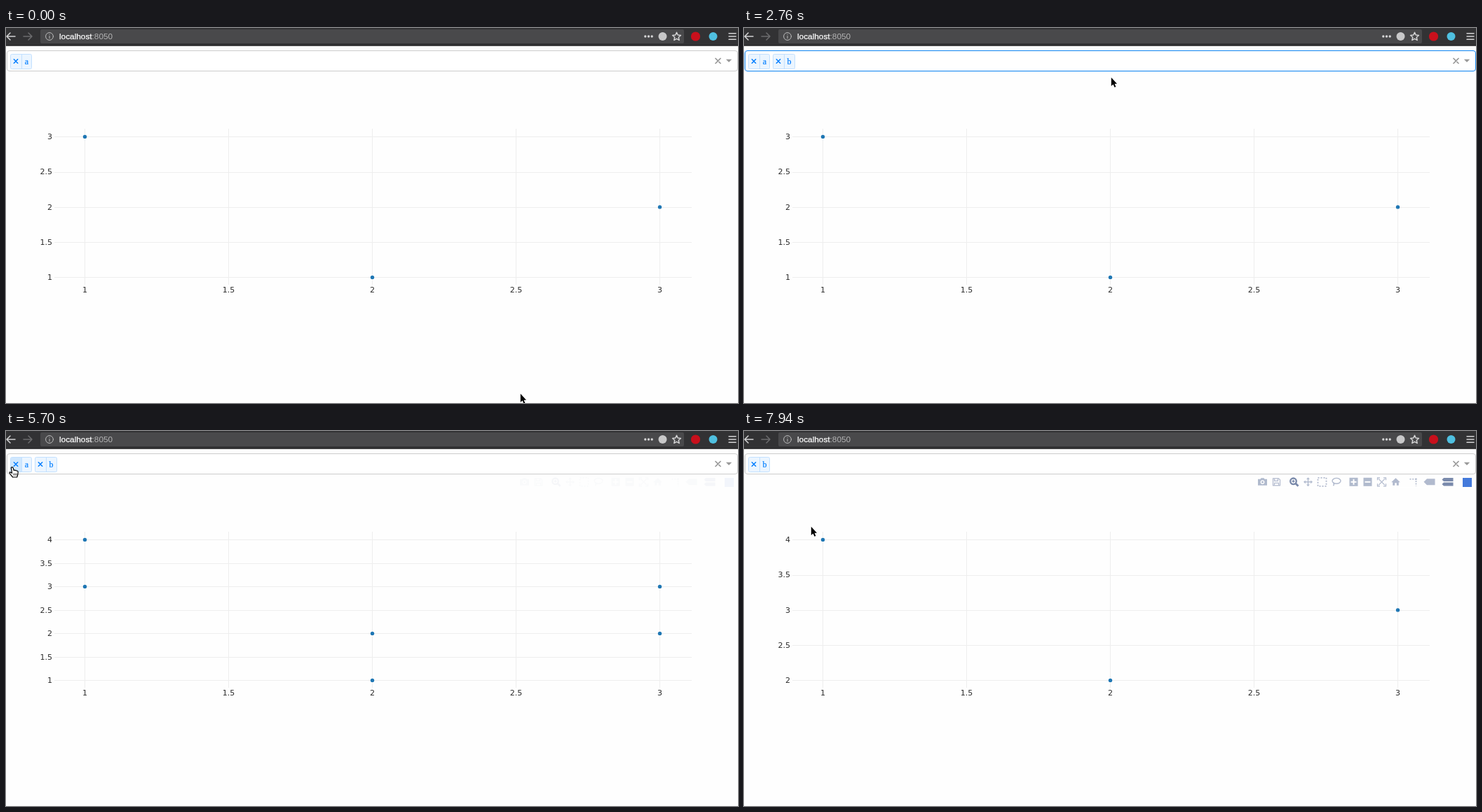
An HTML page for the animation above (8 s loop, 1044x536 px).

```html
<!DOCTYPE html>
<html lang="en">
<head>
<meta charset="utf-8">
<title>Dropdown and scatter plot</title>
<style>
  html, body { margin: 0; height: 100%; overflow: hidden; background: #fefefe; }
  svg { display: block; width: 100vw; height: 100vh; }
  .url { font: 11.8px "Liberation Sans", Arial, sans-serif; fill: #b4b4b5; }
  .tick { font: 11px "DejaVu Sans", Verdana, sans-serif; fill: #2c2c2c; }
  .serif { font: 12px "Liberation Serif", Times, serif; }
  .line { fill: none; stroke-linecap: round; stroke-linejoin: round; }
</style>
</head>
<body>
<svg viewBox="0 0 1044 536">
  <defs>
    <path id="arrow" d="M.8 .8V13L3.5 10.6 5.5 14.8 7.4 14 5.5 9.8H9Z" stroke="#fff" stroke-width="1.5" paint-order="stroke"/>
    <g id="hand" stroke="#000" stroke-width="1.2" stroke-linejoin="round">
      <path fill="#fff" d="M3.3 2.6Q4.6 .6 6 2.4L7.2 6.3Q8.7 5.2 9.3 6.6 10.8 5.7 11.3 7.1 13 6.6 13.2 8.4L12.9 12 11.7 16H5.6L2 11.6Q.2 9.2 1.9 8.7L4.6 10.3Z"/>
      <path fill="none" stroke-width=".8" d="M7 10.5V13.5M9 10.5V13.5M11 10.5V13.5"/>
    </g>
  </defs>
  <rect width="1044" height="536" fill="#fefefe"/>

  <g id="browser">
    <rect width="1044" height="25.5" fill="#323234"/>
    <rect y="24.5" width="1044" height="1" fill="#1d1d1e"/>
    <rect x="49" y="2" width="918" height="20" rx="2" fill="#49494b"/>
    <g class="line" stroke="#d4d4d5" stroke-width="1.5">
      <path d="M13 12H1M6 7L1 12L6 17"/>
      <path stroke="#6c6c6e" d="M25 12H37M32 7L37 12L32 17"/>
      <g stroke="#bbb" stroke-width="1">
        <circle cx="62" cy="12" r="5.4"/>
        <path d="M62 11.5V14.8M62 9.1V9.3"/>
      </g>
      <path id="star"/>
      <path d="M1031 7.7H1041M1031 12H1041M1031 16.3H1041"/>
      <path id="chevron" stroke="#bbb" d="M892.5 10.5L896.5 14.5L900.5 10.5"/>
      <path stroke-width="3.4" d="M911.8 12h0M916.5 12h0M921.2 12h0"/>
    </g>
    <circle cx="936.5" cy="12" r="6" fill="#c8c8c9"/>
    <circle cx="983.5" cy="12" r="6.6" fill="#c8101c"/>
    <circle cx="1008.5" cy="12" r="6" fill="#4fc0e0"/>
    <text class="url" x="76" y="16.3"><tspan fill="#fff" stroke="#fff" stroke-width=".25">localhost</tspan>:8050</text>
  </g>

  <g id="charts"></g>

  <g id="select">
    <rect id="glow" x="0" y="30.5" width="1044" height="33" rx="5" fill="#e6f2ff"/>
    <rect id="control" x="1.5" y="32.5" width="1042" height="29" rx="3.5" fill="#fff"/>
    <g id="menu">
      <path d="M1.5 61.5H1043.5V88Q1043.5 91.5 1040 91.5H5Q1.5 91.5 1.5 88Z" fill="#e5f2fe" stroke="#ccc"/>
      <text id="option" class="serif" x="8.5" y="80"></text>
    </g>
    <g id="tags"></g>
    <path class="line" d="M1012 43.5L1019 50.5M1019 43.5L1012 50.5" stroke="#999" stroke-width="1.7"/>
    <path id="toggle" fill="#999"/>
    <path id="caret" stroke="#000" stroke-width="1.2"/>
  </g>

  <g id="modebar"></g>
  <use id="echo" href="#arrow" x="242" y="66"/>
  <use id="pointer"/>
</svg>

<script>
const LOOP = 8000;
const $ = id => document.getElementById(id);
const show = (id, on) => $(id).setAttribute('visibility', on ? 'visible' : 'hidden');
const within = (v, from, to) => v >= from && v < to;
const clamp = v => Math.min(1, Math.max(0, v));

// Bookmark star
const starPoint = i => {
  const r = i % 2 ? 2.9 : 6.2, a = (i / 5 - .5) * Math.PI;
  return `${956.5 + r * Math.cos(a)} ${12.4 + r * Math.sin(a)}`;
};
$('star').setAttribute('d', 'M' + Array.from({ length: 10 }, (_, i) => starPoint(i)).join('L') + 'Z');

// Charts
const SERIES = { a: [3, 1, 2], b: [4, 2, 3] };
const gridX = x => 112.5 + (x - 1) * 410;

function chart(id, names) {
  const values = names.flatMap(n => SERIES[n]);
  const lo = Math.min(...values), hi = Math.max(...values);
  const py = v => 356.4 - (v - lo) / (hi - lo) * 201;
  let grid = '', labels = '', dots = '';
  for (let x = 1; x <= 3; x += .5) {
    grid += `M${gridX(x)} 144V367`;
    labels += `<text class="tick" text-anchor="middle" x="${gridX(x)}" y="378.3">${x}</text>`;
  }
  for (let v = lo; v <= hi; v += .5) {
    grid += `M69 ${Math.round(py(v)) + .5}H978`;
    labels += `<text class="tick" text-anchor="end" x="66" y="${py(v) + 3.6}">${v}</text>`;
  }
  for (const n of names)
    SERIES[n].forEach((v, i) => dots += `<circle cx="${gridX(i + 1)}" cy="${py(v)}" r="2.7"/>`);
  return `<g id="${id}"><path d="${grid}" stroke="#eee"/>${labels}<g fill="#1f77b4">${dots}</g></g>`;
}
$('charts').innerHTML = chart('plotA', ['a']) + chart('plotAB', ['a', 'b']) + chart('plotB', ['b']);

// Dropdown tags
const tag = (name, x, hot) => `<g transform="translate(${x} 37)">
  <rect x=".5" y=".5" width="${x > 6 ? 31 : 30}" height="21" rx="2" fill="#ebf5ff" stroke="#c2e0ff"/>
  ${hot ? '<rect x="1" y="1" width="15" height="20" fill="#d0e7fd"/>' : ''}
  <path d="M16.5 1V21" stroke="#c2e0ff"/>
  <path class="line" d="M5.3 7.8L10.7 13.2M10.7 7.8L5.3 13.2" stroke="#007eff" stroke-width="1.5"/>
  <text class="serif" x="23.5" y="14.5" text-anchor="middle" fill="#007eff" stroke="#007eff" stroke-width=".2">${name}</text></g>`;

// Plot toolbar: each icon is drawn around its own origin
const solid = d => `<path fill-rule="evenodd" stroke="none" d="${d}"/>`;
const stroke = (d, w = 1.4, dash = '') => `<path fill="none" stroke-width="${w}" stroke-dasharray="${dash}" d="${d}"/>`;
const dark = body => `<g opacity="1.7">${body}</g>`;
const spin = body => [0, 90, 180, 270].map(a => `<g transform="rotate(${a})">${body}</g>`).join('');
const box = 'M-6 -6H6V6H-6Z';
const label = (x, y, h) => `M${x} ${y}l${h / 2} ${-h / 2}H${x + 16}v${h}H${x + h / 2}Z`;

const ICONS = {
  camera: solid('M-6.5 -4H-3L-2 -5.5H2L3 -4H6.5V5H-6.5Z') + '<circle cy=".3" r="2.2" fill="none" stroke="#fff" stroke-width="1.4"/>',
  save: stroke('M-5 -5H3L5 -3V5H-5ZM-3 -5V-1.5H2V-5M-3 5V1.5H3V5', 1.2),
  zoom: '<circle cx="-1" cy="-1" r="4.3" fill="none" stroke-width="2.3"/>' + stroke('M2.3 2.3L6 6', 2.8) + stroke('M-3 -1H1M-1 -3V1'),
  pan: spin(stroke('M0 0V-5') + solid('M0 -6.5L-2.4 -3.7H2.4Z')),
  select: stroke(box, 1.8, '2 2'),
  lasso: '<ellipse cx=".5" cy="-1.5" rx="6" ry="3.9" fill="none" stroke-width="1.4"/>' + stroke('M-4 1Q-2 3 -4 5.5'),
  plus: solid(box) + spin('<path stroke="#fff" stroke-width="2" d="M0 1V-4"/>'),
  minus: solid(box) + '<path stroke="#fff" stroke-width="2" d="M-4 0H4"/>',
  autoscale: spin(stroke('M0 0L4.5 4.5', 1.2) + stroke('M2.5 6H6V2.5', 1.2)),
  home: solid('M-6.3 .4L0 -5.5L6.3 .4H4.3V5H1.3V1.5H-1.3V5H-4.3V.4Z'),
  spike: stroke('M-5 -4H4V6', 1.6, '2 1.7') + '<circle cx="4" cy="-4" r="1.2"/>',
  closest: solid(label(-10, 0, 9)),
  compare: solid(label(-4, -3.2, 5) + label(-4, 3.2, 5))
};
const GROUPS = ['camera save', 'zoom pan select lasso', 'plus minus autoscale home', 'spike', 'closest compare'];
const ACTIVE = ['zoom', 'compare'];

let toolX = 739.5;
const icons = GROUPS.map(group => {
  const row = group.split(' ').map((name, i) =>
    `<g transform="translate(${toolX + 20 * i} 72.8)" opacity="${ACTIVE.includes(name) ? .52 : .3}">${ICONS[name]}</g>`);
  toolX += 20 * row.length + 5;
  return row.join('');
}).join('');
$('modebar').innerHTML = `<rect x="730" y="64.5" width="312" height="16" fill="#fff" opacity=".5"/>
  <g fill="#001f5f" stroke="#001f5f" stroke-width="0">${icons}</g>
  <rect x="1025" y="67" width="13" height="13" fill="#447adb"/>`;

// The screen refreshes in ticks of 118 ms; all motion is held between them
const tickAt = t => t < 240 ? -2 : Math.max(-1, Math.floor((t - 387) / 118));

// Pointer moves: first tick, last tick, destination
const MOVES = [
  [-2, -1, 660, 363], [-1, 0, 560, 482], [0, 3, 84, 4], [3, 6, 520, 24], [6, 8, 29, 40], [8, 10, 505, 38],
  [13, 17, 523, 70], [23, 30, 300, 84], [31, 35, 225, 66.5], [35, 45, 4, 50], [52, 58, 29, 116], [60, 64, 95, 136]
];

function pointerAt(k) {
  let x = 733, y = 522;
  for (const [from, to, toX, toY] of MOVES) {
    const u = clamp((k - from) / (to - from));
    x += (toX - x) * u;
    y += (toY - y) * u;
  }
  return [x, y];
}

// The toolbar fades over three ticks; a trace of it lingers until the next click
const ramp = (k, from) => clamp((k - from) / 3);
const barOpacity = k => ramp(k, -1) - ramp(k, 3) + ramp(k, 20) - ramp(k, 42)
  + ramp(k, 53) + (within(k, 45, 48) ? .06 : 0);

function draw(t) {
  const k = tickAt(t);
  const open = within(t, 1810, 2760) || within(t, 6050, 7600);
  const focus = within(t, 2760, 4170);
  const names = t < 2760 ? 'a' : t < 6050 ? 'ab' : 'b';
  const onCross = within(k, 44, 53);

  show('plotA', t < 3240);
  show('plotAB', within(t, 3240, 6290));
  show('plotB', t >= 6290);

  show('glow', focus);
  $('control').setAttribute('stroke', focus ? '#1a8af0' : '#ccc');
  $('tags').innerHTML = [...names].map((n, i) => tag(n, i ? 41 : 6, onCross && !i)).join('');
  show('menu', open);
  $('option').textContent = t < 4000 ? 'b' : 'a';
  $('toggle').setAttribute('d', open ? 'M1026.8 49H1035.2L1031 44.7Z' : 'M1026.8 44.7H1035.2L1031 49Z');

  // The caret blinks from the moment of each click
  const since = t - (t < 4170 ? 1810 : 6050);
  $('caret').setAttribute('d', `M${names === 'ab' ? 77.5 : 41.5} 40V53.5`);
  show('caret', (open || focus) && since % 1190 < 595);

  show('chevron', within(k, 4, 8));
  $('modebar').setAttribute('opacity', barOpacity(k));

  const hand = onCross || within(k, 15, 20);
  $('pointer').setAttribute('href', hand ? '#hand' : '#arrow');
  $('pointer').setAttribute('transform', `translate(${pointerAt(k)})`);
  show('echo', k === 35);
}

// Active icons are drawn at their group's strength
const start = performance.now();
function frame() {
  draw((performance.now() - start) % LOOP);
  requestAnimationFrame(frame);
}
frame();
</script>
</body>
</html>
```
